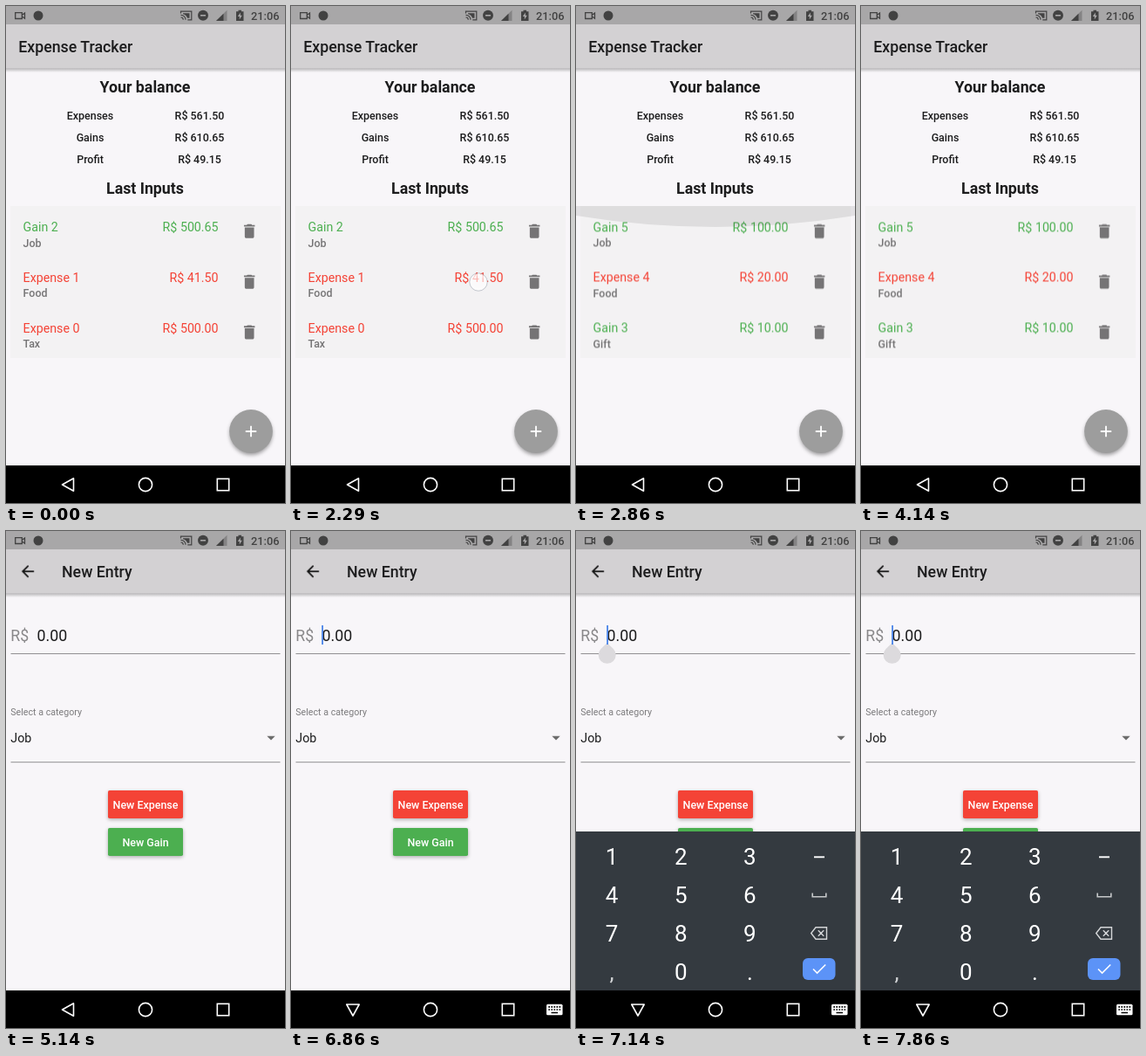
An HTML page that plays this animation: 320x569 px, repeating every 8 s.

```html
<!DOCTYPE html>
<html lang="en">
<head>
<meta charset="utf-8">
<title>Expenses</title>
<style>
  html, body { margin: 0; width: 100%; height: 100%; overflow: hidden; background: #f8f6f9; }
  svg { display: block; width: 100vw; height: 100vh; font-family: Roboto, sans-serif; }
  .m { font-weight: 500; }
  .b { font-weight: 700; }
  .mid { text-anchor: middle; }
  .end { text-anchor: end; }
  .line { fill: none; stroke: #fff; stroke-width: 1.6; }
</style>
</head>
<body>
<svg viewBox="0 0 320 569" xmlns="http://www.w3.org/2000/svg">
  <defs>
    <clipPath id="listClip"><rect y="229" width="320" height="174"/></clipPath>
    <filter id="soft" x="-30%" y="-30%" width="160%" height="160%"><feGaussianBlur stdDeviation="2.2"/></filter>
    <linearGradient id="drop" x2="0" y2="1">
      <stop stop-color="#000" stop-opacity=".28"/>
      <stop offset="1" stop-color="#000" stop-opacity="0"/>
    </linearGradient>
    <path id="bin" d="M6 19c0 1.1.9 2 2 2h8c1.1 0 2-.9 2-2V7H6zM19 4h-3.5l-1-1h-5l-1 1H5v2h14z"/>
    <g id="dot">
      <circle r="10.2" fill="#fff" fill-opacity=".62" stroke="#7d8794" stroke-opacity=".42"/>
      <circle r="8" fill="none" stroke="#fff" stroke-opacity=".35" stroke-width="2"/>
    </g>
  </defs>

  <rect width="320" height="569" fill="#f8f6f9"/>
  <rect y="71" width="320" height="5" fill="url(#drop)"/>
  <rect width="320" height="21.5" fill="#a8a7a8"/>
  <rect y="21.3" width="320" height="50" fill="#d3d1d3"/>

  <g id="status" fill="#424242">
    <path d="M10.7 7.7h7.6v6.8h-7.6zM18.5 10.2l3-2.2v6.2l-3-2.2" fill="none" stroke="#424242" stroke-width="1.3"/>
    <circle cx="37" cy="11" r="5.5"/>
    <path d="M200.5 8.5V6.2h12.300v9.600h-4.500M200.5 10.300a5.500 5.500 0 0 1 5.500 5.500M200.500 13a2.800 2.800 0 0 1 2.800 2.800" fill="none" stroke="#424242" stroke-width="1.2"/>
    <path d="M203 8.300h7.500v5.400h-2.500a7 7 0 0 0-5-4.500z"/>
    <circle cx="226" cy="10.800" r="6"/>
    <path d="M223 10.800h6" stroke="#a8a7a8" stroke-width="1.600"/>
    <path d="M241 17 253.500 4.800V17z" fill-opacity=".35"/>
    <path d="M241 17 249.500 8.700V17z"/>
    <path d="M264 6.200h2.500V4.800h3.500v1.400h2.500V17H264z"/>
    <path d="m268.800 7.500-3 4.600h2v3.400l3-4.700h-2z" fill="#a8a7a8"/>
    <text class="m" x="313.500" y="15.500" font-size="12.800" text-anchor="end">21:06</text>
  </g>

  <g id="home">
    <rect x="5" y="229" width="310" height="174" fill="#f3f2f3"/>
    <g clip-path="url(#listClip)">
      <g id="list"></g>
      <path id="glow" d="M0 229V240Q160 266 320 240V229z" fill="#000" fill-opacity=".085"/>
    </g>
    <circle cx="281" cy="489.500" r="24.500" fill="#000" fill-opacity=".36" filter="url(#soft)"/>
    <circle cx="281" cy="487" r="24.900" fill="#9d9d9d"/>
    <path d="M281 480.800v12.400M274.800 487h12.400" stroke="#fff" stroke-width="1.800"/>
    <use href="#dot" id="drag"/>
    <use href="#dot" id="tapAdd"/>
  </g>

  <g id="form">
    <path transform="translate(14.300 35.600) scale(.889)" fill="#151515"
      d="M20 11H7.830l5.590-5.590L12 4l-8 8 8 8 1.410-1.410L7.830 13H20z"/>
    <path d="M5.500 140.500H314.500M5.500 264.700H314.500" stroke="#919092"/>
    <path d="M299.300 234.800h9.400l-4.700 4.700z" fill="#6c6c6c"/>
    <g id="buttons"></g>
    <path id="handle" d="M35.700 128 42.900 134.900A10 10 0 1 1 28.500 134.900z" fill="#dcdadd"/>
    <rect id="caret" x="35.200" y="108" width="1.800" height="22" fill="#4a83e8"/>
    <use href="#dot" id="tapField"/>
  </g>

  <rect y="526" width="320" height="43" fill="#000"/>
  <g id="pad">
    <rect y="344" width="320" height="182" fill="#343a40"/>
    <g id="keys" fill="#fff"></g>
    <path d="M273 373.300h12" stroke="#fff" stroke-width="1.900"/>
    <path d="M271.200 414.500v4.300h15.600v-4.300" class="line" style="stroke:#c6c8ca"/>
    <path d="M275 453.800h12.500v13.400H275l-5.300-6.700zM277.800 457.300l6.400 6.400M284.200 457.300l-6.400 6.400" class="line" style="stroke:#d4d6d8;stroke-width:1.400"/>
    <rect x="260" y="489" width="37.500" height="25" rx="6" fill="#5c93f7"/>
    <path d="m272 501.500 4.600 4.600 9.600-9.600" class="line"/>
  </g>

  <path id="back" class="line" stroke-linejoin="round" d="M64.500 548 77.500 540.800V555.200z"/>
  <path id="down" class="line" stroke-linejoin="round" d="M71 555 63.800 542H78.200z"/>
  <circle class="line" cx="160" cy="548" r="7.600"/>
  <rect class="line" x="242.300" y="541.300" width="13.400" height="13.400"/>
  <g id="kbIcon">
    <rect x="293" y="541.800" width="18.500" height="12.400" rx="1.500" fill="#fff"/>
    <path d="M295.300 544.900h14M295.300 548h14" stroke="#000" stroke-width="1.700" stroke-dasharray="1.700 1.350"/>
    <path d="M298.500 551.500h7.500" stroke="#000" stroke-width="1.500"/>
  </g>
</svg>

<script>
const LOOP = 8000;
const RED = '#f44336', GREEN = '#4caf50', INK = '#1c1c1d';
const $ = id => document.getElementById(id);
const add = (id, markup) => $(id).insertAdjacentHTML('beforeend', markup);
const text = (s, x, y, size, cls = '', fill = INK) =>
  `<text x="${x}" y="${y}" font-size="${size}" class="${cls}" fill="${fill}">${s}</text>`;

// Home screen
add('home', text('Expense Tracker', 14.2, 53, 17.78, 'm')
  + text('Your balance', 159.5, 98.7, 17.78, 'b mid')
  + text('Last Inputs', 159.5, 215.4, 17.78, 'b mid'));
[['Expenses', '561.50'], ['Gains', '610.65'], ['Profit', '49.15']].forEach(([name, sum], i) => {
  const y = 130 + i * 24.9;
  add('home', text(name, 96.5, y, 12.44, 'm mid') + text('R$ ' + sum, 222, y, 12.44, 'm mid'));
});

const entries = [
  ['Gain', 'Job', '100.00'], ['Expense', 'Food', '20.00'], ['Gain', 'Gift', '10.00'],
  ['Gain', 'Job', '500.65'], ['Expense', 'Food', '41.50'], ['Expense', 'Tax', '500.00']
];
entries.forEach(([kind, group, sum], i) => {
  const y = 229 + i * 57.8, color = kind === 'Gain' ? GREEN : RED;
  add('list', text(`${kind} ${5 - i}`, 19.6, y + 29, 14.22, '', color)
    + text(group, 19.6, y + 46.7, 12.44, 'm', '#757475')
    + text('R$ ' + sum, 243.6, y + 29, 14.22, 'end', color)
    + `<use href="#bin" fill="#757475" transform="translate(268.500 ${y + 18.2}) scale(.889)"/>`);
});

// Entry form
[['New Expense', RED, 297], ['New Gain', GREEN, 340]].forEach(([label, color, y]) => add('buttons',
  `<rect x="117" y="${y + 1.5}" width="86" height="32" rx="2" fill="#000" fill-opacity=".3" filter="url(#soft)"/>
   <rect x="117" y="${y}" width="86" height="32" rx="1.800" fill="${color}"/>`
  + text(label, 160, y + 20.5, 12.44, 'm mid', '#fff')));
add('buttons', text('New Entry', 64, 53, 17.78, 'm')
  + text('R$', 5.3, 126, 17.78, '', '#89888a')
  + text('0.00', 35.5, 126, 17.78)
  + text('Select a category', 5.3, 211.3, 10.67, '', '#7c7b7d')
  + text('Job', 5.3, 241.6, 14.22));

// Number pad
[...'123456789,0.'].forEach((key, i) =>
  add('keys', text(key, 41 + i % 3 * 79.2, 382 + Math.floor(i / 3) * 44, 26, 'mid', key === ',' ? '#d0d2d4' : '#fff')));

// Each row is [ms, value]; values hold until the next row
function hold(id, prop, rows) {
  const frames = rows.map(([ms, v]) => ({ offset: ms / LOOP, [prop]: v, easing: 'step-end' }));
  frames.push({ offset: 1, [prop]: rows[rows.length - 1][1] });
  $(id).animate(frames, { duration: LOOP, iterations: Infinity });
}
const show = (id, ...rows) => hold(id, 'opacity', [[0, 0], ...rows]);
const move = (id, ...rows) => hold(id, 'transform', rows.map(([ms, x, y]) => [ms, `translate(${x}px, ${y}px)`]));

hold('home', 'opacity', [[0, 1], [5140, 0]]);
show('form', [5140, 1]);

move('list', [0, 0, -173.4], [2570, 0, -112], [2720, 0, -38], [2860, 0, 0]);
move('drag', [0, 215, 316], [2430, 214, 332], [2570, 212, 394], [2720, 210, 470]);
show('drag', [2290, 1], [2860, 0]);
show('glow', [2860, 1], [3000, .5], [3140, 0]);
move('tapAdd', [0, 269, 489.5]);
show('tapAdd', [3710, .7], [3850, 1], [4000, .5], [4140, 0]);

move('tapField', [0, 52, 122]);
show('tapField', [6140, .7], [6290, 1], [6430, .5], [6570, 0]);
show('caret', [6720, 1], [7290, 0], [7860, 1]);
show('handle', [7140, 1]);
hold('back', 'opacity', [[0, 1], [6860, 0]]);
show('down', [6860, 1]);
show('kbIcon', [6860, 1]);
move('pad', [0, 0, 21], [7140, 0, 0]);
show('pad', [7000, .72], [7140, 1]);
</script>
</body>
</html>
```
